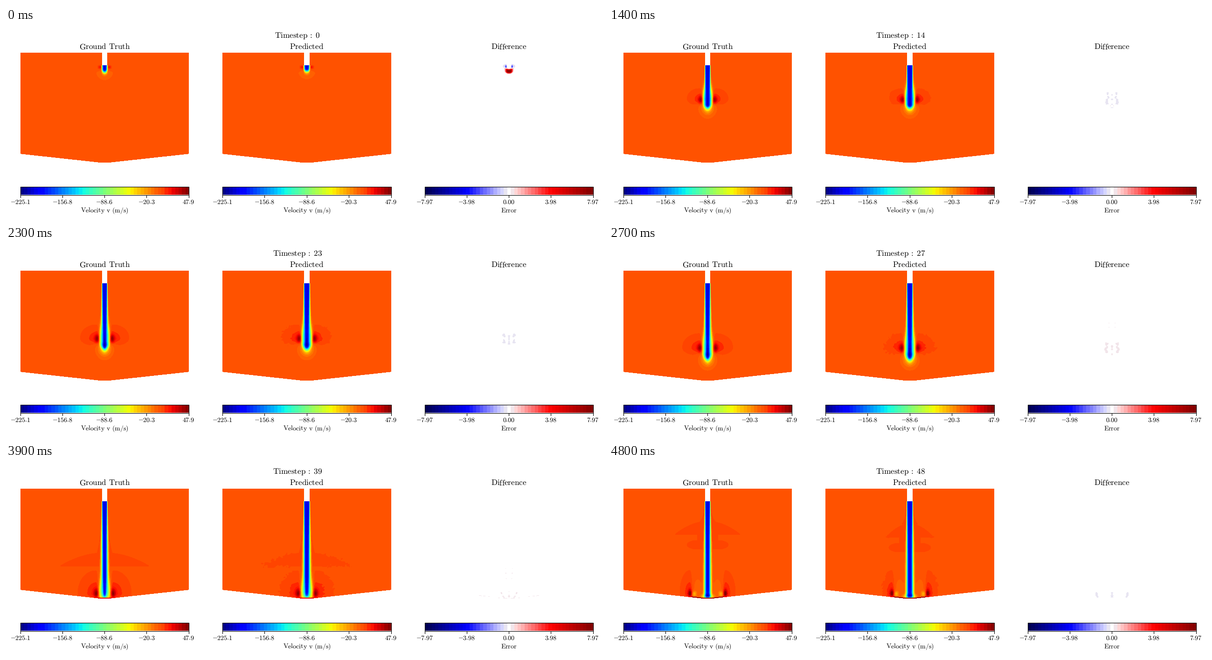
These frames come from a looping animation (1280x408 px, 4900 ms). A matplotlib script:

```python
import numpy as np
import matplotlib.pyplot as plt
from matplotlib.animation import FuncAnimation
from matplotlib.patches import Rectangle

plt.rcParams["mathtext.fontset"] = "cm"
plt.rcParams["text.hinting"] = "none"

DPI, W, H = 100, 1280, 408
FRAMES, STEP_MS = 49, 100
SPANS = ((31, 392), (464, 826), (898, 1259))
PW, TOP, BOTTOM = 361, 53, 290
NOZZLE, IMPACT = 80, 39
BANDS = 49
V_MIN, V_MAX, E_MAX = -225.1, 47.9, 7.97

cols, rows = np.meshgrid(np.arange(PW) - PW // 2, np.arange(TOP, BOTTOM) + 0.5)
X, Y = np.abs(cols).astype(float), rows
FLOOR = 289.3 - np.maximum(0, X - 7) * 19 / 173.5
OUTSIDE = (Y > FLOOR) | ((X < 6) & (Y < NOZZLE))

centres = (np.arange(BANDS) + 0.5) / BANDS
JET = plt.get_cmap("jet")(centres)[:, :3]
SEISMIC = plt.get_cmap("seismic")(centres)[:, :3]
REST, MID = int(-V_MIN / (V_MAX - V_MIN) * BANDS), BANDS // 2
JET[REST], JET[REST + 1] = (1, 0.325, 0), (1, 0.27, 0)
SEISMIC[MID] = 1
SEISMIC[MID + 1], SEISMIC[MID - 1] = (0.95, 0.90, 0.92), (0.91, 0.90, 0.95)


def bell(z):
    return np.exp(-z * z)


def ramp(z):
    z = np.clip(z, 0, 1)
    return z * z * (3 - 2 * z)


def age(t):
    return 1 - np.exp(-t / 8)


def late(t):
    return ramp((t - IMPACT - 1) / 7)


def vortex_pos(t):
    x = 13 + 0.13 * t - 3.5 * np.exp(-t / 2) + 2.05 * max(0, t - IMPACT)
    return x, min(84 + 5 * t, 278)


def tip_pos(t):
    return 97 + 5.55 * t


def smooth_noise(seed):
    rng = np.random.default_rng(seed)
    n = np.kron(rng.uniform(-1, 1, (80, 121)), np.ones((3, 3)))[:X.shape[0], :PW]
    for axis in (0, 1, 0, 1):
        n = (n + np.roll(n, 1, axis) + np.roll(n, -1, axis)) / 3
    return n / n.std()


def jet_flow(t, x, y, tip):
    """Downward jet with a wider rounded head."""
    vy = vortex_pos(t)[1]
    s = np.maximum(y - NOZZLE, 0)
    steady = np.exp(-(x / (5.8 + 0.006 * s)) ** (2.6 + 6 * np.exp(-s / 40)))

    size = 0.65 + 0.35 * min(t / 8, 1)
    share = max(0.95 - 0.013 * t, 0.55)
    shoulder = (9 + t / 18) * size
    head = (1 - share) * bell(x / (4 * size)) + share * np.exp(-(x / shoulder) ** 4)
    mix = bell(np.minimum(y - vy, 0) / (6 + 22 * age(t)))
    mix *= 1 - ramp((t - IMPACT) / 6)
    flow = 200 * (steady * (1 - mix) + head * mix)
    flow += 9 * mix * bell(x / 4) * bell((y - vy - 3) / 11)

    soft = 2 + age(t)
    edge = np.clip((y + x * x / 14 - tip + soft) / soft, -30, 30)
    wall = 1 - np.exp(-np.maximum(BOTTOM - y, 0) / 5)
    return -flow * wall / (1 + np.exp(edge)) * (y >= NOZZLE)


def ring_flow(t, x, y):
    """Upward return flow: a compact core and a broad weak tail outside it."""
    vx, vy = vortex_pos(t)
    a, end = age(t), late(t)
    dx, dy = x - vx, y - vy
    core = (18 + 8 * a + 8 * end) * bell(dx / (5 - end)) * bell(dy / (4 + 5 * a - 2 * end))

    lean = dx + 0.35 * np.exp(-t / 15) * dy
    up = 1.2 - 0.4 * ramp((t - 31) / 8)
    r2 = (lean * (1 + 0.8 * end)) ** 2 + (dy * np.where(dy < 0, up, 2.2)) ** 2
    tail = 18 * a / (1 + r2 / (19 * a + 0.1) ** 2)
    return core + tail * bell(np.minimum(dx, 0) / 5)


def rising_wave(t, x, y, pred):
    """Crescent of weak upward flow that climbs away from the floor."""
    since = t - IMPACT
    end = late(t)
    top = 190 - 7.5 * since + 6 * end * pred
    span = (95 - 25 * (since / 9) ** 2) * (1 - 0.28 * end * pred)
    inner = max(0, 45 - 11 * (since + 9))
    u = x / span
    zone = (u < 1) & (x > inner) & (y > top + 28 * u * u) & (y < top + 30)
    # stem and lower cap
    zone |= (x < 23 * end) & (y > top + 20) & (y < top + 52)
    zone |= ((x - 22) / 23) ** 2 + ((y - top - 51) / 10) ** 2 < end
    # sleeve around the jet
    f = np.clip((y - 88) / (top - 88), 0, 1)
    return zone | ((x < 7.5 + 2 * f + 7 * f ** 4) & (y > 88) & (y < top + 2))


def velocity(t, pred=False):
    x, y = X, Y
    vx, vy = vortex_pos(t)
    tip, end = tip_pos(t), late(t)
    if pred:
        tip -= 2 * np.exp(-t)
        n = smooth_noise(100 + t)
        warp = 2.2 * ramp(t / 35) * ramp((X - vx - 6) / 15)
        x = np.abs(X + warp * n)
        y = Y + warp * np.roll(n, 40, 1)
    v = jet_flow(t, x, y, tip) + ring_flow(t, x, y)

    # flow pushed ahead of the head
    push = (10 + 16 * age(t)) * (1 - ramp((t - 31) / 5))
    r2 = (1.1 * x) ** 2 + (y - tip + 6) ** 2
    v -= push * np.exp(-r2 / 290) * ramp((y - vy - 4) / 10)

    # wash along the floor after the impact
    v -= end * 26 * bell((x - vx + 9) / 5) * bell((y - 279) / 6)
    v -= end * 6 * bell((x - 21) / 8) * bell((y - 264) / 16)
    v -= end * 60 * bell(x / 12) * bell((y - 284) / 5)
    if t >= 30:
        zone = rising_wave(t, x, y, pred) & (v > -2.2)
        v = np.where(zone, np.maximum(v, 5), v)
    if t >= 36:
        film = (FLOOR - Y < 2) & (X < vx - 3)
        v = np.where(film, np.maximum(v, 24 + 16 * end), v)
    return v


def error(t):
    vx, vy = vortex_pos(t)
    tip = tip_pos(t)
    start = np.exp(-t / 1.2)
    bowl = (Y - tip + 4 + (X / 6) ** 2 * 1.5) / 4.5
    e = 7.4 * start * np.exp(-(X / 7.5) ** 4 - bowl ** 4)
    e -= 3.6 * start * bell((X - 6.5) / 1.3) * bell((Y - 83) / 3.5)
    e -= 0.8 * start * bell((X - 9.5) / 3) * bell((Y - 82) / 3)
    if t == 0:
        return e

    e += 1.3 * np.exp(-t / 10) * bell(X / 5) * bell((Y - tip + 7) / 3.5)
    n = smooth_noise(300 + t)
    n = n[np.arange(n.shape[0])[:, None], PW // 2 + X.astype(int)]
    tall = 20 - 12 * ramp((t - 30) / 9)
    env = np.maximum(bell((X - vx + 5) / 5), bell(X / 4))
    env = env * np.exp(-((Y - vy - 2) / tall) ** 4)
    marks = (env > 0.2) & (0.7 * n + 2 * env > 2)
    after = t - IMPACT
    if -14 < after < 4:
        marks |= (abs(X - 6.5) < 1.5) & (abs(Y - vy + 40) < 14) & (n > 0.6)
    if -2 <= after <= 4:
        marks |= (FLOOR - Y < 1) & (X < 80 + 5 * after) & (n > 0)
    sign = 1 if -14 < after < 4 else -1
    return e + 0.33 * sign * marks


def paint(values, lo, hi, colours):
    band = ((values - lo) / (hi - lo) * BANDS).astype(int)
    rgb = colours[np.clip(band, 0, BANDS - 1)]
    rgb[OUTSIDE] = 1
    return rgb


def panels(t):
    return (paint(velocity(t), V_MIN, V_MAX, JET),
            paint(velocity(t, True), V_MIN, V_MAX, JET),
            paint(error(t), -E_MAX, E_MAX, SEISMIC))


fig = plt.figure(figsize=(W / DPI, H / DPI), dpi=DPI, facecolor="white")
ax = fig.add_axes([0, 0, 1, 1])
ax.axis("off")


def label(x, y, text, px):
    return ax.text(x, y, text, fontsize=px * 72 / DPI, ha="center", va="baseline")


def roman(text):
    return "$" + r"\hspace{0.38}".join(r"\mathrm{%s}" % w for w in text.split()) + "$"


def picture(rgb, span, top, bottom):
    return ax.imshow(rgb, extent=(*span, bottom, top), aspect="auto",
                     interpolation="nearest")


def colorbar(span, colours, lo, hi, name):
    left, right = span
    picture(colours[None], span, 341, 358)
    ax.add_patch(Rectangle((left - 0.5, 340.5), right - left, 18,
                           fill=False, ec="black", lw=0.8))
    for x, tick in zip(np.linspace(left, right, 5), np.linspace(lo, hi, 5)):
        ax.plot([x - 0.5, x - 0.5], [358.5, 363.5], color="black", lw=0.8)
        text = f"{tick:.1f}" if hi > 10 else f"{int(tick * 100) / 100:.2f}"
        label(x - 0.5, 377.3, f"${text}$", 14)
    label((left + right) / 2, 395.5, roman(name), 14)


images = [picture(rgb, span, TOP, BOTTOM) for rgb, span in zip(panels(0), SPANS)]
for span, title in zip(SPANS, ("Ground Truth", "Predicted", "Difference")):
    label(sum(span) / 2, 46, roman(title), 17.2)
for span in SPANS[:2]:
    colorbar(span, JET, V_MIN, V_MAX + 0.02, "Velocity v (m/s)")
colorbar(SPANS[2], SEISMIC, -E_MAX, E_MAX, "Error")
counter = label(625, 21.3, "", 17.2)
ax.set_xlim(0, W)
ax.set_ylim(H, 0)


def update(t):
    for image, rgb in zip(images, panels(t)):
        image.set_data(rgb)
    counter.set_text(r"$\mathrm{Timestep}\hspace{0.18}:\hspace{0.3}%d$" % t)
    return [*images, counter]


anim = FuncAnimation(fig, update, frames=FRAMES, interval=STEP_MS,
                     init_func=lambda: update(0), repeat=True, repeat_delay=0)
plt.show()
```
